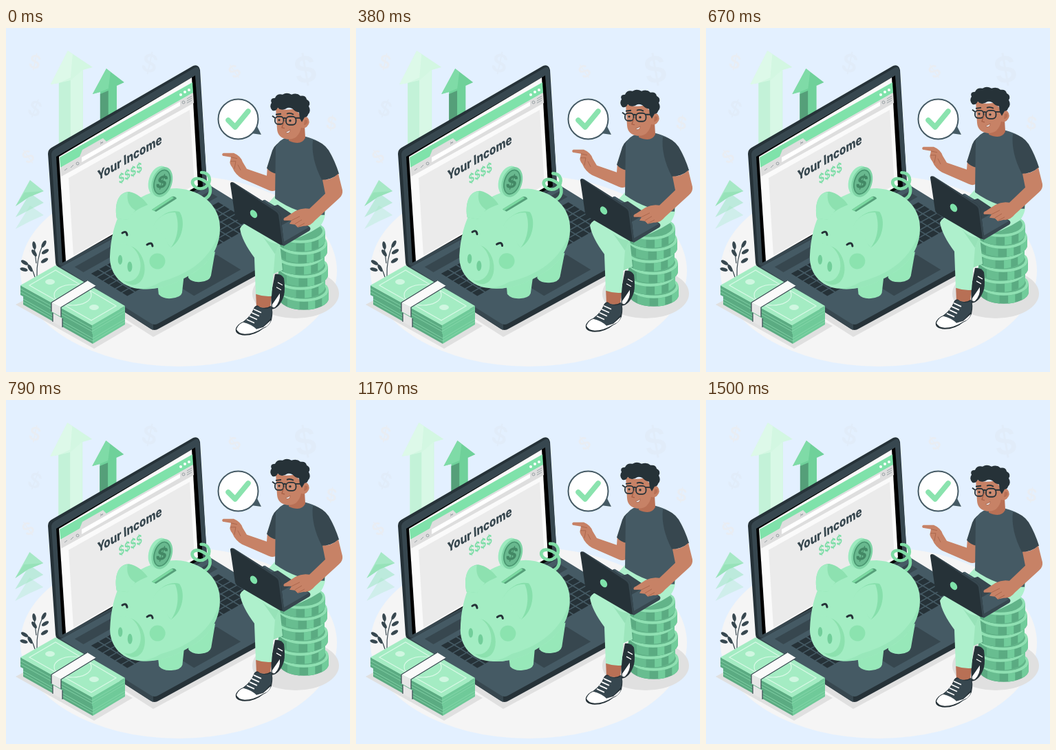
Animation of 500x500 px, one loop 1540 ms. Source, as an HTML page:

```html
<!DOCTYPE html>
<html lang="en">
<head>
<meta charset="utf-8">
<title>Your Income</title>
<style>
html, body { margin: 0; width: 100%; height: 100%; overflow: hidden; background: #e3f0ff; }
svg { display: block; width: 100vw; height: 100vh; }
text { font-family: Inter, "Open Sans", sans-serif; }
</style>
</head>
<body>
<svg viewBox="0 0 500 500" xmlns="http://www.w3.org/2000/svg">
  <rect width="500" height="500" fill="#e3f0ff"/>
  <g id="marks" font-weight="600" text-anchor="middle"></g>
  <ellipse cx="251" cy="353" rx="230" ry="139" fill="#f5f5f5"/>

  <g id="arrows">
    <path fill="#d3f7e2" d="M90 33 126 57 112 61V170L77 175V80L65 82Z"/>
    <path fill="#e0fbec" d="M90 33 65 82 77 80 94 72 97 38Z" opacity=".8"/>
    <path fill="#c3f2d8" d="M77 80 94 76V170H77Z"/>
    <path fill="#d8f8e6" d="M94 76 111 61V170H94Z"/>
    <path fill="#6fd19a" d="M146 59 172 79 161 84V134L137 145V93L126 96Z"/>
    <path fill="#85dfab" d="M146 59 126 96 137 93 149 88 152 64Z" opacity=".75"/>
    <path fill="#559f79" d="M137 96 149 91V140L137 146Z"/>
    <path fill="#6fd19a" d="M149 91 161 84V134L149 140Z"/>
    <path fill="#a9e8c6" d="M35 258 55 272 35 281 14 292Z" opacity=".35"/>
    <path fill="#9de6bf" d="M35 240 55 254 35 264 14 275Z" opacity=".55"/>
    <path fill="#a3e8c3" d="M35 221 55 237 33 246 14 259Z" opacity=".95"/>
    <path fill="#8adfb0" d="M27 239 55 237 33 246 14 259Z" opacity=".55"/>
  </g>

  <!-- large laptop -->
  <path fill="#e0e0e0" d="M150 408 214 449 380 359 340 350Z"/>
  <path fill="#263238" d="M75 343V350L210 437Q216 441 222 437L433 322V313Z"/>
  <path fill="#37474f" d="M75 343V350L210 437 214 439V430Z"/>
  <path fill="#455a64" d="M78 341 292 226 433 313 222 429Q216 433 210 429L76 345Z"/>
  <g id="keys"></g>
  <path fill="#263238" d="M61 183Q61 177 66 174L272 55Q280 52 282 61L292 226Q292 232 287 234L82 346Q73 350 72 341Z"/>
  <path fill="#37474f" d="M66 184Q66 179 71 176L274 58Q280 55 281 62L292 226Q292 231 287 233L84 345Q77 348 76 340Z"/>
  <path fill="#000" d="M73 187 275 69 286 230 82 341Z"/>
  <path fill="#fafafa" d="M77 187 270 72 279 229 87 339Z"/>
  <path fill="#7fe2aa" d="M78 188 271 79 272 94 79 203Z"/>
  <path fill="#dedede" d="M79 203 107 187 111 177 141 160 146 165 272 94 273 109 80 216Z"/>
  <path fill="#fff" d="M110 188 253 107 253 113 110 195Z"/>
  <path fill="#ebebeb" d="M91 218 267 119 274 228 98 331Z"/>
  <g fill="none" stroke="#9aa2a6" stroke-width="1">
    <path d="M85 207l4-3M94 203l4-4M137 169l4-4M137 166l4 1M263 103l7-4M263 106l7-4M263 109l7-4"/>
    <circle cx="104" cy="197" r="2"/><circle cx="258" cy="108" r="2"/>
  </g>
  <g fill="#fff"><circle cx="254" cy="97" r="2"/><circle cx="260" cy="93" r="2"/><circle cx="266" cy="90" r="2"/></g>
  <text transform="matrix(.8 -.465 .05 1 133 222)" font-size="19" font-weight="800" fill="#37474f">Your Income</text>
  <text transform="matrix(.73 -.42 .07 1 164 227)" font-size="18" font-weight="600" fill="#7bdda6">$$$$</text>

  <!-- plant -->
  <path fill="none" stroke="#37474f" stroke-width="1.2" d="M45 362Q44 335 54 314M42 362Q38 345 24 338M44 342 41 318"/>
  <g id="leaves" fill="#37474f"></g>

  <!-- banknotes -->
  <path fill="#e0e0e0" d="M14 402 70 372 184 433 128 466Z"/>
  <path fill="#5bab82" d="M25 388 126 444V459L25 402Z"/>
  <path fill="#6fca99" d="M126 444 173 416V431L126 459Z"/>
  <path fill="#a4ecc3" d="M25 388 126 444 173 416 170 411 30 385Z"/>
  <path fill="#5bab82" d="M21 374 125 432V445L21 388Z"/>
  <path fill="#6fca99" d="M125 432 173 404V417L125 445Z"/>
  <path fill="none" stroke="#8ad9ad" stroke-width=".8" d="M21 379 125 437 173 409M21 384 125 441 173 413M25 394 126 451 173 423M25 398 126 455 173 427"/>
  <path fill="#a4ecc3" d="M21 374 72 345 173 404 125 432Z"/>
  <g fill="none" stroke="#d9f9e7" stroke-width="1.2">
    <path d="M34 374 72 352 160 404 124 425Z"/>
    <ellipse cx="97" cy="388" rx="27" ry="15"/>
  </g>
  <g fill="#d0f7e1"><ellipse cx="64" cy="369" rx="7" ry="4"/><ellipse cx="128" cy="406" rx="7" ry="4"/></g>
  <path fill="#fafafa" d="M118 367 131 375 80 406 66 399Z"/>
  <path fill="#e6e6e6" d="M66 399 80 406V420L66 412ZM68 414 82 422V435L68 427Z"/>
  <path fill="none" stroke="#37474f" stroke-width="1.2" d="M118 367 66 399V412M131 375 80 406V420M68 414V427M82 422V435"/>

  <!-- piggy bank -->
  <g id="pig">
    <path fill="none" stroke="#7fdca5" stroke-width="4.600" stroke-linecap="round" d="M284 210C296 210 300 222 290 231C280 238 267 228 272 221C278 215 292 222 296 230C299 240 294 247 287 249"/>
    <path fill="#97e8b9" d="M265 340V363Q270 370 283 369Q296 368 298 360L304 325Z"/>
    <path fill="#97e8b9" d="M219 360 222 387Q228 394 240 393Q254 392 256 385L259 358Z"/>
    <path fill="#a3edc3" d="M166 268C189 246 215 234 248 233C286 235 311 260 311 290C311 322 293 345 269 358C248 371 222 382 195 379C172 378 151 361 151 333C152 305 158 284 166 268Z"/>
    <path fill="#92e5b4" d="M311 296C309 326 290 346 269 358C248 371 222 382 195 379Q210 378 225 369C256 360 293 345 311 296Z" opacity=".6"/>
    <path fill="#8de1b0" d="M161 277C157 255 164 238 179 238C190 240 200 248 206 257C191 263 181 269 177 279Z"/>
    <path fill="#a3edc3" d="M161 277C157 255 164 238 177 239C175 250 178 259 188 265L177 279Z"/>
    <path fill="#86dfab" d="M214 288C221 273 238 263 252 267C261 279 258 307 240 319C231 313 235 296 214 288Z"/>
    <path fill="#a3edc3" d="M213 289C220 274 234 267 246 268C252 282 251 304 240 319C230 311 232 296 213 289Z"/>
    <path fill="#559f79" d="M212 264 241 245Q246 244 248 248L218 267Z"/>
    <path fill="#7bd9a1" d="M212 264 241 245 244 247 215 266Z"/>
    <ellipse cx="181" cy="345" rx="20" ry="29" fill="#8ce1ae" transform="rotate(-15 181 345)"/>
    <ellipse cx="174" cy="341" rx="21" ry="28" fill="#a3edc3" transform="rotate(-16 174 341)"/>
    <g fill="#72ce9a"><ellipse cx="166" cy="337" rx="3.200" ry="7"/><ellipse cx="180" cy="347" rx="3.500" ry="7.500"/></g>
    <circle cx="220" cy="339" r="11.500" fill="#8be3af"/>
    <path fill="none" stroke="#263238" stroke-width="3" stroke-linecap="round" d="M169 298Q175 294 176 301M205 315Q212 310 213 317"/>
  </g>

  <!-- coin -->
  <g transform="rotate(18 224 223)">
    <ellipse cx="222" cy="223" rx="14.500" ry="22.500" fill="#9ceabf"/>
    <ellipse cx="227" cy="223" rx="14.500" ry="22.500" fill="#7fd3a5"/>
    <ellipse cx="227" cy="223" rx="11" ry="18" fill="#69b98f" stroke="#4a9871" stroke-width="1.800"/>
    <text transform="matrix(.85 -.3 0 1 227 232)" font-size="26" font-weight="800" text-anchor="middle" fill="#438865">$</text>
  </g>

  <!-- bubble -->
  <path fill="#455a64" d="M356 153 371 155 364 141Z"/>
  <circle cx="337.500" cy="132.500" r="29" fill="#fff" stroke="#455a64" stroke-width="2"/>
  <path fill="none" stroke="#8ae3ae" stroke-width="7.500" stroke-linecap="round" stroke-linejoin="round" d="M323 134 333 144 352 121"/>

  <ellipse cx="421" cy="386" rx="63" ry="36" fill="#e0e0e0"/>

  <g id="man">
    <g id="stack"></g>
    <!-- far leg -->
    <path fill="#9ce6bc" d="M385 305 397 303 402 352 388 358Z"/>
    <path fill="#263238" d="M391 358Q400 357 404 364Q406 380 404 389Q398 408 386 409L385 388Z"/>
    <path fill="#fff" d="M398 386Q399 398 391 406Q386 408 387 402Z"/>
    <path fill="none" stroke="#fff" stroke-width="1.300" d="M395 370l7 4M393 377l7 4"/>
    <!-- near leg -->
    <path fill="#b87055" d="M363 383 386 385 384 408 364 406Z"/>
    <path fill="#263238" d="M361 406Q365 401 369 406Q378 409 385 404Q389 411 386 425Q382 434 374 437Q362 447 347 447Q332 446 334 437Q337 430 345 427Q356 419 361 406Z"/>
    <path fill="#37474f" d="M362 407Q366 403 370 407Q378 410 385 406Q388 412 385 422L374 434 364 438 345 427Q357 419 362 407Z"/>
    <path fill="#fff" d="M335 438Q338 430 345 428Q357 431 364 438L374 435 385 425Q383 433 374 436Q360 445 347 445Q337 444 335 438Z"/>
    <path fill="none" stroke="#fff" stroke-width="1.800" d="M350 424 361 429M354 419 365 424M357 414 368 419M360 409 371 414"/>
    <path fill="#aef0cc" d="M340 292Q343 284 357 281L392 243 463 258Q467 276 456 289Q432 305 397 314L391 329 386 390Q374 391 363 387L361 334Q343 310 340 292Z"/>
    <path fill="#97e2b8" d="M397 314Q379 313 370 299Q383 317 391 329Z"/>
    <!-- pointing arm -->
    <path fill="#c78266" d="M380 202 393 208 393 235Q389 239 382 236L343 219Q333 213 329 203Q324 197 326 193L327 188 315 186Q313 183 316 182L331 182Q341 186 344 195L350 205 379 215Z"/>
    <path fill="none" stroke="#a9654b" stroke-width=".9" d="M327 188 336 190M326 194 334 194 332 205M337 199 341 207"/>
    <!-- torso -->
    <path fill="#37474f" d="M397 167Q388 171 385 185L379 204Q385 211 394 212Z"/>
    <path fill="#455a64" d="M410 159Q397 162 392 173L391 248Q424 272 463 272L466 215 468 178Q457 163 435 158Z"/>
    <path fill="#37474f" d="M446 163Q461 166 469 178Q478 193 484 212Q473 221 459 221Q443 190 446 163Z"/>
    <path fill="#b87055" d="M411 148 434 142 435 160Q429 172 411 164Z"/>
    <!-- head -->
    <path fill="#c78266" d="M392 115Q402 121 418 118L427 125 428 135Q432 127 438 130Q444 137 437 144Q433 147 429 145Q425 163 409 162Q395 160 394 147Z"/>
    <path fill="#263238" d="M387 120Q382 114 386 109Q383 102 391 102Q394 95 402 97Q408 93 415 97Q423 94 428 99Q436 98 437 104Q444 108 440 114Q444 121 439 126Q438 130 434 130L430 137 427 132 426 123Q420 122 417 118Q411 114 406 118Q399 121 395 116Q392 122 387 120Z"/>
    <path fill="#b87055" d="M434 134Q439 132 438 138Q436 142 433 141Z"/>
    <g fill="#e4c4b4" fill-opacity=".15" stroke="#263238" stroke-width="1.800">
      <rect x="391" y="129" width="12.500" height="11" rx="4.500"/><rect x="407" y="129" width="14.500" height="12" rx="5"/>
    </g>
    <path fill="none" stroke="#263238" stroke-width="1.800" d="M387 128 391 131M403 132Q405 130 407 132M421 131 432 131M392 126 400 125M408 125Q413 123 418 126"/>
    <g fill="#263238"><circle cx="397" cy="134" r="1.600"/><circle cx="413" cy="135" r="1.700"/></g>
    <path fill="none" stroke="#a45e45" stroke-width="1.200" d="M404 136 401 145 405 146"/>
    <path fill="#fff" stroke="#8b4c38" stroke-width=".6" d="M407 151Q411 151 413 148Q413 153 408 153Z"/>
    <!-- small laptop -->
    <path fill="#37474f" d="M371 252 376 250 441 289Q444 292 441 295L404 317 397 314 396 272Z"/>
    <path fill="#455a64" d="M373 251 376 250 440 290 402 312 399 270Z"/>
    <path fill="#37474f" d="M383 261 395 257 422 275 401 287Z"/>
    <path fill="#263238" d="M326 227Q326 223 331 225L394 265Q398 268 399 272L404 313Q403 317 398 315L338 280Q334 278 333 274Z"/>
    <path fill="#37474f" d="M329 225 331 225 394 265Q398 268 399 272L404 313 402 316 396 272Q395 269 392 267Z"/>
    <ellipse cx="360" cy="270.500" rx="4.500" ry="6.500" fill="#7fe2aa" transform="rotate(-35 360 270.500)"/>
    <!-- typing arm -->
    <path fill="#c78266" d="M460 221Q474 221 483 212L489 236Q490 243 484 248L449 280Q442 289 433 288L424 290 420 286 412 285 415 280 404 280Q402 277 407 275L421 266Q431 261 441 263L464 241Z"/>
    <path fill="none" stroke="#a9654b" stroke-width=".9" d="M415 280 427 274M420 285 430 279M425 289 434 284"/>
  </g>
</svg>
<script>
const $ = id => document.getElementById(id);

// Background dollar signs: x, y, angle, size, colour
const pale = '#e9edf3', faint = '#e1ecf9';
$('marks').innerHTML = [[42, 49, 12, 27, pale], [332, 63, -35, 25, pale], [473, 138, 8, 25, pale],
  [32, 187, -35, 25, pale], [209, 51, 12, 36, faint], [435, 60, -10, 52, faint], [42, 117, 20, 30, faint]]
  .map(([x, y, a, s, c]) => `<text fill="${c}" transform="translate(${x} ${y}) rotate(${a})" y="${s * .36}" font-size="${s}">$</text>`).join('');

$('leaves').innerHTML = [[55, 314, 30], [41, 316, -10], [57, 325, 60], [41, 327, -35], [27, 341, -60],
  [56, 338, 60], [26, 351, -75], [35, 349, -30]]
  .map(([x, y, a]) => `<ellipse cx="${x}" cy="${y}" rx="2.600" ry="5.800" transform="rotate(${a} ${x} ${y})"/>`).join('');

// Keyboard deck coordinates: u along the hinge, v towards the front
const deck = (u, v) => `${(80 + 212 * u + 141 * v).toFixed(1)},${(345 - 119 * u + 87 * v).toFixed(1)}`;
const tile = (u0, u1, v0, v1, fill) =>
  `<polygon fill="${fill}" points="${deck(u0, v0)} ${deck(u1, v0)} ${deck(u1, v1)} ${deck(u0, v1)}"/>`;
let keys = tile(.04, .96, .08, .17, '#37474f') + tile(.3, .62, .67, .92, '#37474f');
for (let r = 0; r < 6; r++)
  for (let c = 0; c < 16; c++) {
    const u = .06 + c * .055, v = .22 + r * .064;
    keys += tile(u, u + .047, v, v + .053, '#263238');
  }
$('keys').innerHTML = keys;

// Edge band of a coin between two angles
const band = (x, y, from, to, fill) => {
  const p = (a, dy) => `${(x + 36 * Math.cos(a)).toFixed(1)} ${(y + dy + 17 * Math.sin(a)).toFixed(1)}`;
  return `<path fill="${fill}" d="M${p(from, 0)}A36 17 0 0 1 ${p(to, 0)}L${p(to, 12)}A36 17 0 0 0 ${p(from, 12)}Z"/>`;
};
const coin = (x, y) => `<path fill="#5bab82" d="M${x - 36} ${y}v12a36 17 0 0 0 72 0v-12z"/>
  ${band(x, y, 0, .75, '#72cc9b')}${band(x, y, 1.1, 1.4, '#72cc9b')}${band(x, y, 1.75, 2.3, '#68bd90')}
  <ellipse cx="${x}" cy="${y}" rx="36" ry="17" fill="#8fe0b2"/>
  <ellipse cx="${x}" cy="${y - 1}" rx="32" ry="14" fill="#62b489"/>`;
$('stack').innerHTML = [433, 428, 432, 427, 431, 428].map((x, i) => coin(x, 381 - 17 * i)).join('');

// Linear interpolation through [position, value] stops
const track = (stops, p) => {
  let i = 1;
  while (stops[i][0] < p) i++;
  const [a, x] = stops[i - 1], [b, y] = stops[i];
  return x + (y - x) * (p - a) / (b - a);
};
const shake = [0, -1, 2, -4, 4, -4, 4, -4, 2, -1, 0].map((x, i) => [i / 10, x]);
const sway = [[0, 0], [.25, 1.5], [.75, -1.5], [1, 0]];
const bob = [[0, 0], [.5, -10], [1, 0]];
const LOOP = 1540, CYCLE = 1500, LEAD = 20, FPS = 24;

function draw(t) {
  const step = Math.floor(t * FPS / 1000 + .1);
  const p = (step * 1000 / FPS + LEAD) % CYCLE / CYCLE;
  $('arrows').setAttribute('transform', `translate(${track(shake, p)} 0)`);
  $('pig').setAttribute('transform', `rotate(${track(sway, p)} 231 300)`);
  $('man').setAttribute('transform', `translate(0 ${track(bob, p)})`);
}

const start = performance.now();
function loop() {
  draw((performance.now() - start) % LOOP);
  requestAnimationFrame(loop);
}
loop();
</script>
</body>
</html>
```
